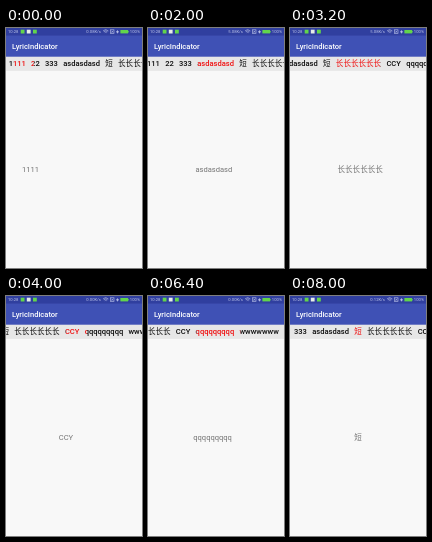
An HTML page with a canvas for the animation above (8.2 s loop, 136 px wide and 240 px high).

```html
<!DOCTYPE html>
<html lang="en">
<head>
<meta charset="utf-8">
<title>LyricIndicator</title>
<style>
html, body { margin: 0; width: 100%; height: 100%; overflow: hidden; background: #f8f8f8; }
canvas { display: block; width: 136px; height: 240px; }
</style>
</head>
<body>
<canvas id="stage"></canvas>
<script>
const W = 136, H = 240, LOOP = 8200, STEP = 200;
const BAR = 7.56, STRIP = 28.7, BODY = 42.8;
const FONT = 'Roboto, "Noto Sans CJK SC", "Noto Sans CJK", sans-serif';
const SIZE = 7.55, PAD = 2.65, TAB_WEIGHT = 500, BASE = 38.4;
const DARK = '#0c0c0c', RED = '#f01010';
const LABELS = ['1111', '22', '333', 'asdasdasd', '短', '长长长长长长', 'CCY', 'qqqqqqqqq', 'wwwwwww', 'rrrr'];

// Page swipes: start ms, end ms, target page
const SWIPES = [
  [-204, 336, 1], [520, 1080, 2], [1240, 1780, 3], [1960, 2500, 4],
  [2700, 3240, 5], [3300, 3840, 6], [3920, 4460, 7], [4498, 5038, 8],
  [5080, 5480, 9], [5480, 5900, 8], [5911, 6451, 7],
  [6480, 7000, 6], [7000, 7480, 5], [7480, 7980, 4]
];
const SPEEDS = [[0, '0.08'], [2000, '5.08'], [3400, '0.00'], [7200, '0.12']];

const canvas = document.getElementById('stage');
const ctx = canvas.getContext('2d');
const scale = window.devicePixelRatio || 1;
canvas.width = Math.round(W * scale);
canvas.height = Math.round(H * scale);

const lerp = (a, b, k) => a + (b - a) * k;
const smooth = u => u * u * (3 - 2 * u);

function setFont(size, weight = 400) {
  ctx.font = `${weight} ${size}px ${FONT}`;
}

function rect(color, x, y, w, h) {
  ctx.fillStyle = color;
  ctx.fillRect(x, y, w, h);
}

function text(str, x, y, color, align = 'left') {
  ctx.fillStyle = color;
  ctx.textAlign = align;
  ctx.fillText(str, x, y);
}

function layout() {
  setFont(SIZE, TAB_WEIGHT);
  let x = 0;
  return LABELS.map(label => {
    const w = ctx.measureText(label).width;
    const tab = { label, w, x: x + PAD, mid: x + PAD + w / 2 };
    x += w + 2 * PAD;
    tab.end = x;
    return tab;
  });
}

function pageAt(t) {
  let page = 0;
  for (const [start, end, to] of SWIPES) {
    if (t < start) break;
    page = lerp(page, to, smooth(Math.min(1, (t - start) / (end - start))));
  }
  return page;
}

function clippedText(str, x, y, from, to, color) {
  if (to <= from) return;
  ctx.save();
  ctx.beginPath();
  ctx.rect(from, STRIP, to - from, BODY - STRIP);
  ctx.clip();
  text(str, x, y, color);
  ctx.restore();
}

function drawStatus(t) {
  const ink = '#bcc3e8', green = '#62d54b';
  rect('#303f9f', 0, 0, W, BAR);
  setFont(4.2);
  text('10:28', 2, 5.2, ink);
  rect(green, 14.7, 1.7, 3.8, 3.8);
  rect('#e6ece6', 20.8, 1.7, 3.8, 3.8);
  rect(green, 27, 1.7, 3.8, 3.8);

  const speed = SPEEDS.filter(s => s[0] <= t).pop()[1];
  text(speed + 'K/s', 95, 5.2, ink, 'right');

  // Wi-Fi arcs
  ctx.strokeStyle = ink;
  ctx.lineWidth = 0.6;
  for (const r of [1.3, 2.6, 3.8]) {
    ctx.beginPath();
    ctx.arc(99.7, 5.6, r, -Math.PI * 0.75, -Math.PI * 0.25);
    ctx.stroke();
  }
  // Empty SIM slot
  ctx.strokeRect(104.6, 1.8, 3.4, 3.8);
  ctx.beginPath();
  ctx.moveTo(105.4, 2.7);
  ctx.lineTo(107.2, 4.7);
  ctx.moveTo(107.2, 2.7);
  ctx.lineTo(105.4, 4.7);
  ctx.stroke();
  // Charging mark and battery
  rect(ink, 110, 3.4, 3, 0.9);
  rect(ink, 111.1, 2.4, 0.9, 2.9);
  rect(green, 114.4, 2, 7.6, 3.4);
  rect(green, 122, 2.9, 0.7, 1.6);
  text('100%', 134, 5.2, ink, 'right');
}

function drawTabs(tabs, page) {
  const i = Math.floor(page), off = page - i;
  const next = tabs[Math.min(i + 1, tabs.length - 1)];
  const max = tabs[tabs.length - 1].end - W;
  const scroll = Math.max(0, Math.min(max, lerp(tabs[i].mid, next.mid, off) - W / 2));
  rect('#e7e7e7', 0, STRIP - 1, W, BODY - STRIP + 1);
  setFont(SIZE, TAB_WEIGHT);
  tabs.forEach((tab, n) => {
    const x = tab.x - scroll;
    if (x > W || x + tab.w < 0) return;
    if (n !== i && n !== i + 1) return text(tab.label, x, BASE, DARK);
    const split = off ? x + tab.w * off : x - 1;
    const [left, right] = n === i ? [DARK, RED] : [RED, DARK];
    clippedText(tab.label, x, BASE, x - 1, split, left);
    clippedText(tab.label, x, BASE, split, x + tab.w + 1, right);
  });
}

function draw(t, tabs) {
  const page = pageAt(t);
  ctx.setTransform(scale, 0, 0, scale, 0, 0);
  rect('#f8f8f8', 0, 0, W, H);
  setFont(SIZE);
  LABELS.forEach((label, n) => {
    const shift = n - page;
    if (Math.abs(shift) < 1) text(label, W / 2 + shift * W, 144, '#757575', 'center');
  });
  drawTabs(tabs, page);
  rect('#3f51b5', 0, 0, W, STRIP);
  setFont(SIZE, 500);
  text('LyricIndicator', 6, 20.7, '#fff');
  drawStatus(t);
}

const tabs = layout();
const begin = performance.now();

function frame() {
  const t = (performance.now() - begin) % LOOP;
  draw(Math.floor(t / STEP) * STEP, tabs);
  requestAnimationFrame(frame);
}
frame();
</script>
</body>
</html>
```
